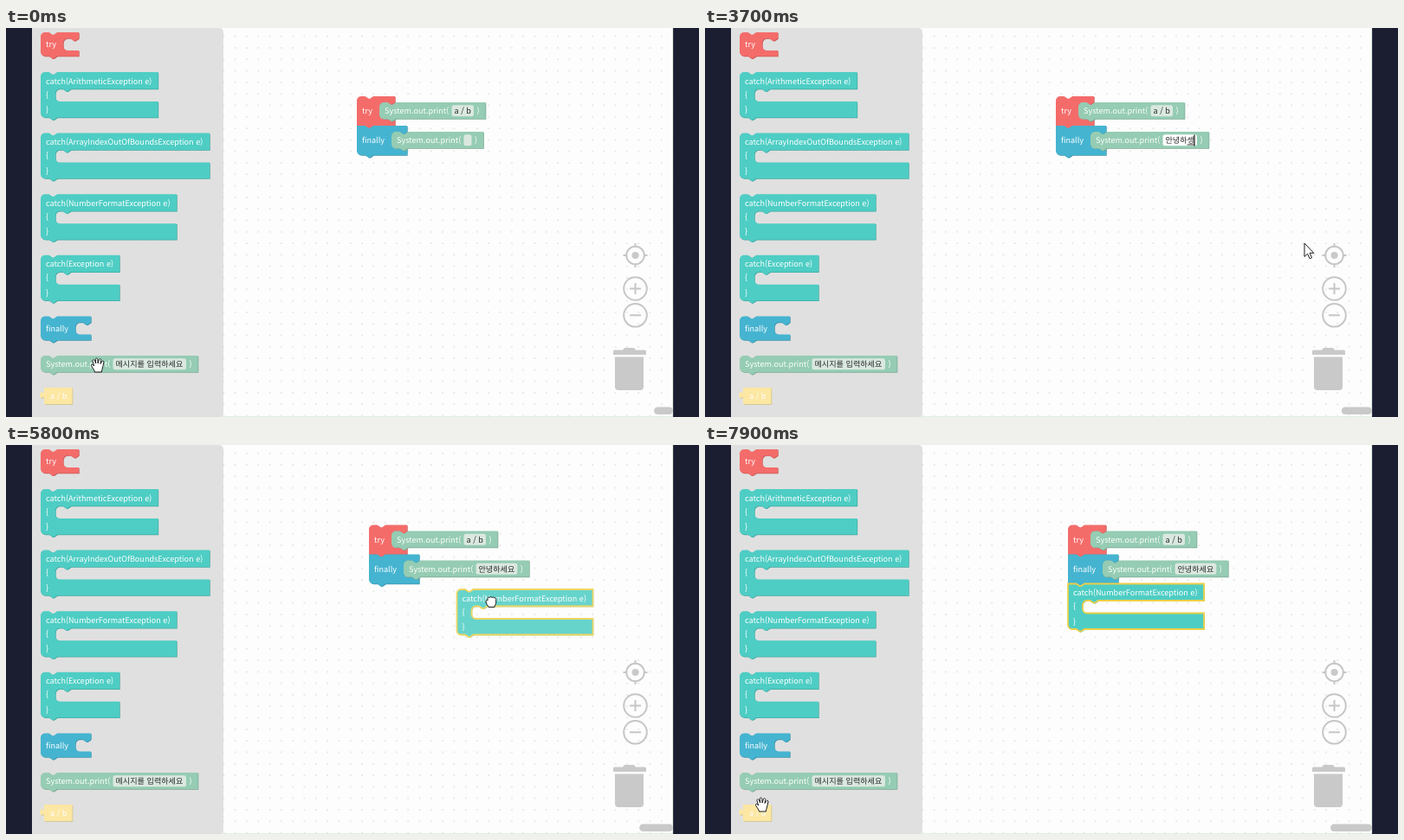
Write an HTML page that moves like this. It is 800 px wide and 450 px high and loops after 8000 ms.

```html
<!DOCTYPE html>
<html lang="ko">
<head>
<meta charset="utf-8">
<style>
html, body { margin: 0; width: 100%; height: 100%; overflow: hidden; background: #1b1e31; }
svg { display: block; width: 800px; height: 450px; }
text { font: 500 9.1px "Noto Sans CJK KR", "Noto Sans", sans-serif; fill: #fff; white-space: pre; text-rendering: geometricPrecision; }
.dark { fill: #2b2b2b; }
.edge { filter: brightness(.82); }
.icon { fill: none; stroke: #c6c6c6; stroke-width: 2; }
.solid { fill: #c9c9c9; }
.selected { fill: none; stroke: #ecd04a; stroke-width: 1.8; }
.pointer { fill: #fff; stroke: #1a1a1a; stroke-width: 1; stroke-linejoin: round; }
</style>
</head>
<body>
<svg viewBox="0 0 800 450">
  <defs>
    <pattern id="dots" x="258" y="3" width="13.3" height="13.3" patternUnits="userSpaceOnUse">
      <rect x="6" y="6" width="1.4" height="1.4" fill="#d6d6d6"/>
    </pattern>
  </defs>
  <rect width="800" height="450" fill="#1b1e31"/>
  <rect x="30" width="740" height="450" fill="#fdfdfd"/>
  <rect x="30" width="740" height="450" fill="url(#dots)"/>
  <path d="M769.7 0V449.6H30" fill="none" stroke="#d3e6d8" stroke-width=".7"/>
  <g class="icon">
    <circle cx="726.5" cy="263" r="10.3"/>
    <path d="M726.5 249v4M726.5 273v4M712.5 263h4M736.5 263h4"/>
    <circle cx="726.5" cy="301.5" r="13.3"/>
    <path d="M720 301.5h13M726.5 295v13"/>
    <circle cx="726.5" cy="332.3" r="13.3"/>
    <path d="M720 332.3h13"/>
  </g>
  <g class="solid">
    <circle cx="726.5" cy="263" r="4"/>
    <path d="M701 378v-4q0-1.5 1.5-1.5H712l2-2.5h11l2 2.5h10.5q1.5 0 1.5 1.5v4z"/>
    <path d="M703 380.5h33V415q0 4-4 4H707q-4 0-4-4z"/>
    <rect id="scrollbar" y="438.5" height="8.5" rx="4.2"/>
  </g>
  <g id="workspace"></g>
  <path d="M30 0H246q5 0 5 5V445q0 5-5 5H30z" fill="#ddd" fill-opacity=".9"/>
  <g id="palette"></g>
  <g id="dragged" opacity=".85"></g>
  <g id="cursor"></g>
</svg>
<script>
(() => {
  const LOOP = 8000, GLYPH = 8.37;
  const RED = '#f46c6a', TEAL = '#4ecdc4', BLUE = '#45b4d0', GREEN = '#95ccb3', YELLOW = '#fce7a3';
  const $ = id => document.getElementById(id);

  const label = (x, y, s, cls = '') => `<text x="${x}" y="${y}" class="${cls}">${s}</text>`;
  const place = (x, y, body) => `<g transform="translate(${x} ${y})">${body}</g>`;
  const shape = (d, fill) =>
    `<path class="edge" d="${d}" fill="${fill}" transform="translate(.7 .7)"/><path d="${d}" fill="${fill}"/>`;

  // Outline pieces shared by all stackable blocks
  const NOTCH = 'l4 2.7h1.6l4-2.7', NOTCH_BACK = 'l-4 2.7h-1.6l-4-2.7';
  const topEdge = (w, square) => (square ? 'M0 0H9.5' : 'M0 5a5 5 0 0 1 5-5H9.5') + NOTCH + `H${w}`;
  const bottomEdge = (h, square) => `V${h}H19.1${NOTCH_BACK}` + (square ? 'H0z' : 'H5a5 5 0 0 1-5-5z');

  const rowPath = w => topEdge(w) + bottomEdge(19);
  function cupPath(w, arm, head, gap, foot, flatTop, flatBottom) {
    return topEdge(w, flatTop) + `V${head}H${arm + 18}${NOTCH_BACK}H${arm + 5}` +
      `a5 5 0 0 0-5 5v${gap - 10}a5 5 0 0 0 5 5H${w}` + bottomEdge(head + gap + foot, flatBottom);
  }

  const wordBlock = (name, color, arm, w, filled, flatTop, flatBottom) =>
    shape(cupPath(w, arm, 7, filled ? 19.5 : 14, filled ? 7.5 : 6.5, flatTop, flatBottom), color) +
    label(6, filled ? 20 : 17, name);

  function catchBlock(type, w, { flatTop = false, selected = false } = {}) {
    const d = cupPath(w, 17, 19.5, 14.5, 18.5, flatTop);
    return shape(d, TEAL) + (selected ? `<path class="selected" d="${d}"/>` : '') +
      label(6, 13.6, `catch(${type} e)`) + label(6, 29.5, '{') + label(6, 47.3, '}');
  }

  function printBlock(value, fieldWidth, { editing = false, caret = false } = {}) {
    const x = 83.5, end = x + fieldWidth, textEnd = x + 3 + value.length * GLYPH;
    let s = shape(rowPath(end + 13.6), GREEN) + label(6, 13, 'System.out.print(') +
      `<rect x="${x}" y="3.3" width="${fieldWidth}" height="13" rx="2.5" fill="${editing ? '#fff' : '#dae8e0'}"/>` +
      label(x + 3, 13.1, value, 'dark') + label(end + 3.5, 13, ')');
    if (editing && value) s += `<path d="M${textEnd - GLYPH} 15h${GLYPH}" stroke="#222" stroke-width=".9"/>`;
    if (caret) s += `<path d="M${textEnd + (value ? 0 : 1.6)} 3.5v13" stroke="#111" stroke-width="1.2"/>`;
    return s;
  }

  $('palette').innerHTML =
    place(40, 5, wordBlock('try', RED, 26, 44)) +
    [['ArithmeticException', 135.5], ['ArrayIndexOutOfBoundsException', 195],
     ['NumberFormatException', 157], ['Exception', 91]]
      .map(([type, w], i) => place(40, 51 + i * 70.6, catchBlock(type, w))).join('') +
    place(40, 333.5, wordBlock('finally', BLUE, 40, 58)) +
    place(40, 379, printBlock('메시지를 입력하세요', 84.5)) +
    place(44, 416, shape('M0 0H32.5V19H0V13c0-6-4.5 4-4.5-4.500s4.5 2 4.5-4.5z', YELLOW) + label(7, 13, 'a / b'));

  const pointer = d => `<path class="pointer" d="${d}"/>`;
  const ARROW = pointer('M0 0V15.5l3.6-3.3 2.5 5.6 2.5-1.1-2.5-5.4h4.7z');
  const OPEN_HAND = pointer('M-3.500 8C-4 5-7 2.5-7.5.5-7.7-1-5.8-1.3-4.3 1L-6-4.5C-6.3-6.5-4-7-3.4-5L-2.3-2-2.7-6.5c0-2 2.3-2 2.5 0L.2-2 1.3-6.2c.5-1.8 2.7-1.3 2.4.6L3-1.5 4.6-4c1-1.5 2.9-.6 2.3 1L5.500 3C5.2 5 4.3 6 4.3 8z');
  const FIST = pointer('M-3 6.5C-3.5 4.5-6 3-6-.2c0-1.5 1.5-1.6 2-.8V-3.500c0-2 2-2 2.5-.8.4-1.5 2.3-1.5 2.7 0 .5-1.2 2.3-1 2.5.4.7-.8 2-.3 2 1.2V1c0 2.5-1.7 3.5-1.7 5.5z');

  // Pointer stops: time, x, y
  const STOPS = [
    [0, 106, 390], [150, 106, 390], [850, 533, 130], [1200, 533, 130], [1800, 692, 249],
    [4150, 692, 249], [4900, 105, 199], [5050, 79.5, 206.5], [5200, 79.5, 206.5],
    [5500, 440, 168], [5800, 560, 181], [6300, 458, 175], [6900, 520, 260], [7700, 66, 416], [LOOP, 66, 416]
  ];
  function pointerAt(t) {
    const i = STOPS.findIndex((stop, k) => k && t <= stop[0]);
    const [t0, x0, y0] = STOPS[i - 1], [t1, x1, y1] = STOPS[i];
    const u = (t - t0) / (t1 - t0), e = u * u * (3 - 2 * u);
    return [x0 + (x1 - x0) * e, y0 + (y1 - y0) * e];
  }

  const EDIT = 1000, TYPE = 2367, KEY = 133, GRAB = 5200, BUMP = 5500, DROP = 6300;
  const TYPED = ['', 'ㅇ', '아', '안', '안ㄴ', '안녀', '안녕', '안녕ㅎ', '안녕하', '안녕핫', '안녕하세', '안녕하셍', '안녕하세요'];

  function render(t) {
    const [px, py] = pointerAt(t);
    const count = Math.max(0, Math.min(TYPED.length - 1, Math.floor((t - TYPE) / KEY) + 1));
    const value = TYPED[count];
    const lastKey = count ? TYPE + (count - 1) * KEY : EDIT;
    const editing = t >= EDIT && t < GRAB;
    const caret = editing && (t - lastKey) % 1200 < 600;
    const fieldWidth = Math.max(9, value.length * GLYPH + 6);
    const bumped = t >= BUMP, dropped = t >= DROP;
    const dragging = t >= GRAB && !dropped;
    const x = bumped ? 419 : 405, y = bumped ? 92.5 : 79;
    const caught = flatTop => catchBlock('NumberFormatException', 157, { flatTop, selected: true });

    $('workspace').innerHTML =
      place(x, y, wordBlock('try', RED, 26, 44, true, false, true)) +
      place(x, y + 34, wordBlock('finally', BLUE, 40, 58, true, true, dropped)) +
      place(x + 26, y + 7, printBlock('a / b', 25.5)) +
      place(x + 40, y + 41, printBlock(value, fieldWidth, { editing, caret })) +
      (dropped ? place(x, y + 68, caught(true)) : '');
    $('dragged').innerHTML = dragging ? place(px - 39.5, py - 14, caught(false)) : '';

    const left = dropped ? 722 : 748 - (fieldWidth - 9) * .435;
    $('scrollbar').setAttribute('x', left);
    $('scrollbar').setAttribute('width', 770 - left);

    const hidden = t > DROP && t < 6900;
    const open = t < 250 || (t >= 5000 && t < GRAB) || t > 7500;
    $('cursor').innerHTML = hidden ? '' : place(px, py, dragging ? FIST : open ? OPEN_HAND : ARROW);
  }

  let start;
  function tick(now) {
    start ??= now;
    render(Math.floor((now - start) % LOOP / 100) * 100);
    requestAnimationFrame(tick);
  }
  render(0);
  requestAnimationFrame(tick);
})();
</script>
</body>
</html>
```
